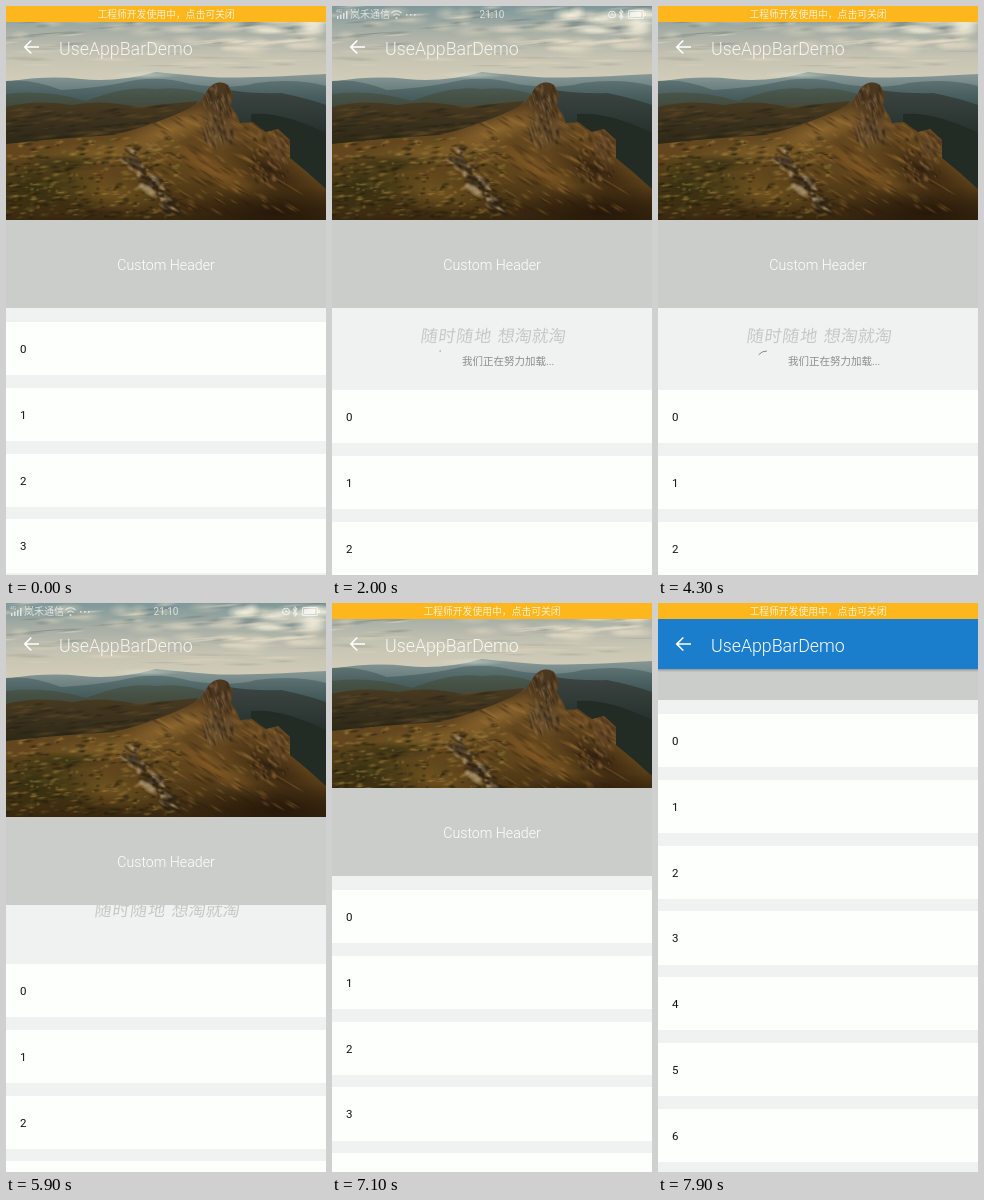
Recreate the animation shown at these times as an HTML page with a canvas. Size 320 by 569 pixels, loop 8 s.

```html
<!DOCTYPE html>
<html lang="zh">
<head>
<meta charset="utf-8">
<title>UseAppBarDemo</title>
<style>
  html, body { margin: 0; width: 100%; height: 100%; overflow: hidden; }
  #stage { position: relative; width: 320px; height: 569px; overflow: hidden; background: #f0f2f1;
    font-family: Roboto, "Noto Sans CJK SC", "Noto Sans CJK", sans-serif; }
  #stage div, #stage svg, canvas { position: absolute; left: 0; }
  .item { width: 320px; height: 53.3px; background: #fdfffd; color: #111; font-size: 11.5px;
    line-height: 54px; text-indent: 14px; }
  #refresh { width: 320px; height: 68px; }
  #refresh svg { top: 0; }
  #header { width: 320px; height: 88px; background: #cbcdcb; color: #fff; font-size: 14.2px;
    font-weight: 300; line-height: 90px; text-align: center; }
  #bar { top: 0; width: 320px; overflow: hidden; }
  #scrim { top: 0; width: 320px; height: 214px; background: #1a7ecd; }
  #shade { width: 320px; height: 3px; background: linear-gradient(#0004, #0000); }
  #chrome { top: 0; }
  #banner { top: 0; width: 320px; height: 16px; background: #fdb61b; color: #fffc; font-size: 9.8px;
    line-height: 17px; text-align: center; white-space: nowrap; }
</style>
</head>
<body>
<div id="stage">
  <div id="list"></div>
  <div id="refresh">
    <svg width="320" height="68" fill="none" stroke-linecap="round">
      <g fill="#c6c8c6" font-size="17" font-weight="300" letter-spacing=".8" font-family="'Noto Sans CJK SC', 'Noto Sans CJK', sans-serif">
        <text transform="translate(88 34) skewX(-8)">随时随地</text>
        <text transform="translate(165 34) skewX(-8)" letter-spacing="0">想淘就淘</text>
      </g>
      <g id="spinner" stroke="#858785" stroke-width="1">
        <path id="arc" pathLength="1" d="M0-10A10 10 0 0 0 0 10A10 10 0 0 0 0-10"/>
        <path id="arrow" d="M0-5V5M-4 1L0 5L4 1"/>
      </g>
      <text id="hint" y="57" fill="#8b8d8b" font-size="10.5"></text>
    </svg>
  </div>
  <div id="header">Custom Header</div>
  <div id="bar">
    <canvas id="photo" width="320" height="214"></canvas>
    <div id="scrim"></div>
  </div>
  <div id="shade"></div>
  <svg id="chrome" width="320" height="66" fill="none" stroke="#fff" stroke-width="1.7">
    <path d="M33 41H19M25.3 34.5L18.8 41L25.3 47.5"/>
    <text id="title" x="53" y="48.5" fill="#fff" stroke="none" font-size="17.8" font-weight="300">UseAppBarDemo</text>
    <g id="status" fill="#fff" stroke="none" font-size="10" opacity=".7">
      <path d="M5 13v-3h1.500v3zM8 13V8.500h1.500V13zM11 13V7h1.500v6zM14 13V5h1.500v8z"/>
      <text x="4" y="7" font-size="5">4G</text>
      <text x="18" y="12">岚禾通信</text>
      <g fill="none" stroke="#fff" stroke-width="1.100">
        <path d="M59.500 7q5-4.500 10 0M61.500 9.500q3-3 6 0"/>
        <circle cx="280" cy="8.500" r="3.300"/>
        <path d="M280 6.500v2h1.500M287 5.500l4 5.500-2 2V4l2 2-4 5.500"/>
        <rect x="296.500" y="4.500" width="15" height="8" rx="1.500"/>
      </g>
      <circle cx="64.500" cy="12" r="1"/>
      <path d="M74 8h1.500v1.500H74zM78 8h1.500v1.500H78zM82 8h1.500v1.500H82zM298 6h11v5h-11zM312.500 7h1.500v3h-1.500z"/>
      <text x="160" y="12" text-anchor="middle">21:10</text>
    </g>
  </svg>
  <div id="banner">工程师开发使用中，点击可关闭</div>
</div>
<script>
const LOOP = 8000, STEP = 100, PITCH = 65.8, HINT_H = 68;
const $ = id => document.getElementById(id);
const clamp = v => Math.max(0, Math.min(1, v));

// [time, pixels]
const PULL = [[400, 0], [500, 8], [800, 45], [1000, 66], [1300, 90], [1600, 96], [1700, 96],
  [1800, 84], [1900, 73], [2000, 68], [5700, 68], [5800, 60], [5900, 45], [6000, 29],
  [6100, 15], [6200, 6], [6300, 2], [6700, 0]];
const SCROLL = [[6900, 0], [7000, 10], [7100, 29], [7300, 82], [7500, 136], [7700, 181], [7900, 205]];

function track(keys, t) {
  const i = keys.findIndex(k => k[0] >= t);
  if (i < 0) return keys[keys.length - 1][1];
  if (!i) return keys[0][1];
  const [t0, v0] = keys[i - 1], [t1, v1] = keys[i];
  return v0 + (v1 - v0) * (t - t0) / (t1 - t0);
}

function paintPhoto() {
  const c = $('photo').getContext('2d');
  let seed = 7;
  const rnd = () => (seed = seed * 16807 % 2147483647) / 2147483647;
  const fade = (y0, y1, ...cols) => {
    const g = c.createLinearGradient(0, y0, 0, y1);
    cols.forEach((col, i) => g.addColorStop(i / (cols.length - 1), col));
    return g;
  };
  const shape = (d, fill) => { c.fillStyle = fill; c.fill(new Path2D(d)); };
  const blob = (x, y, rx, ry, rgb, a, turn = 0) => {
    c.save();
    c.translate(x, y);
    c.rotate(turn);
    c.scale(rx, ry);
    const g = c.createRadialGradient(0, 0, 0, 0, 0, 1);
    g.addColorStop(0, `rgba(${rgb},${a})`);
    g.addColorStop(1, `rgba(${rgb},0)`);
    c.fillStyle = g;
    c.fillRect(-1, -1, 2, 2);
    c.restore();
  };
  // Short soft strokes scattered over a box, all leaning the same way
  const scatter = (n, x, y, w, h, len, turn, rgbs, a) => {
    for (let i = 0; i < n; i++) {
      blob(x + rnd() * w, y + rnd() * h, len * (.4 + rnd()), 1 + rnd() * 1.6, rgbs[i % rgbs.length], a, turn);
    }
  };

  // Sky
  c.fillStyle = fade(0, 75, '#7f9899', '#a7aea5', '#c5c3b2', '#d2cdb9');
  c.fillRect(0, 0, 320, 80);
  scatter(60, 0, 0, 320, 40, 24, -.08, ['236,226,204', '104,116,116'], .5);
  for (let i = 0; i < 45; i++) blob(rnd() * 320, 4 + rnd() * 42, 8 + rnd() * 15, 3 + rnd() * 5, '238,227,202', .4);
  for (let i = 0; i < 14; i++) blob(235 + rnd() * 85, 5 + rnd() * 22, 9 + rnd() * 12, 4 + rnd() * 4, '255,247,226', .6);
  scatter(30, 0, 38, 320, 25, 26, 0, ['224,214,190', '160,160,148'], .45);

  // Receding hills
  shape('M0 76Q40 69 75 73T150 66Q180 69 205 71T320 68V130H0Z', fade(66, 100, '#8a9b98', '#50666a'));
  shape('M0 75Q25 72 55 84Q90 82 115 77Q150 68 185 78Q225 84 250 77Q290 72 320 80V140H0Z', fade(72, 108, '#607675', '#34494b'));
  blob(140, 69, 35, 4, '222,226,214', .5);
  shape('M0 88Q40 83 80 95Q120 79 150 83Q180 80 205 90V140H0Z', fade(80, 120, '#4c5b51', '#37392a'));
  shape('M222 84Q250 88 275 87Q300 92 320 99V214H222Z', fade(82, 140, '#3c4541', '#202c28'));
  shape('M245 108Q275 105 320 127V195H245Z', '#222b24');
  shape('M0 101Q30 93 66 99Q96 93 130 101L192 95L160 140H0Z', fade(94, 140, '#493b22', '#2c2716'));
  scatter(70, 0, 100, 165, 32, 12, -.12, ['108,81,40', '30,27,16'], .45);

  // Near slope
  c.save();
  c.clip(new Path2D('M0 138Q55 132 108 129Q148 119 180 104L194 96L203 82Q212 73 222 79L227 89L225 100L231 109L234 117L246 116L260 126L272 123L284 134L284 152L301 166L320 183V214H0Z'));
  c.fillStyle = fade(75, 214, '#50391f', '#664820', '#60441b', '#38270f');
  c.fillRect(0, 70, 320, 144);
  blob(165, 124, 70, 15, '151,111,50', .75, -.35);
  blob(205, 163, 60, 12, '145,98,39', .7, .55);
  blob(100, 146, 75, 13, '140,106,43', .6, -.08);
  blob(98, 185, 70, 20, '133,99,37', .65, .2);
  blob(30, 180, 70, 32, '45,44,15', .8);
  blob(62, 157, 45, 9, '48,46,17', .75);
  blob(265, 165, 55, 22, '44,28,13', .75, .5);
  blob(270, 207, 100, 28, '36,22,8', .9);
  scatter(500, 0, 132, 175, 80, 5, -.12, ['157,126,58', '29,26,9', '87,78,31'], .55);
  scatter(190, 145, 112, 145, 95, 11, .55, ['164,119,55', '40,26,11'], .38);
  // Crags
  blob(212, 96, 19, 31, '67,51,32', .9);
  blob(214, 126, 22, 19, '107,83,53', .75);
  scatter(75, 198, 79, 30, 62, 6, 1.25, ['142,111,70', '38,28,18'], .5);
  blob(272, 140, 14, 23, '99,70,40', .8);
  scatter(65, 247, 127, 38, 50, 5, 1, ['142,104,61', '39,27,16'], .5);
  for (let i = 0; i < 75; i++) {
    const k = rnd();
    const x = 120 + k * 45 + rnd() * 14 - 7, y = 146 + k * 55 + rnd() * 16 - 8;
    blob(x, y, 3 + rnd() * 6, 2 + rnd() * 3, i % 3 ? '39,28,17' : '187,163,122', .75, .5);
  }
  c.restore();
}

const items = Array.from({ length: 10 }, (_, i) => {
  const el = document.createElement('div');
  el.className = 'item';
  el.textContent = i;
  $('list').append(el);
  return el;
});

function draw(time) {
  const t = Math.floor(time % LOOP / STEP) * STEP;
  const pull = track(PULL, t), scroll = track(SCROLL, t);
  const edge = 302 - scroll, barH = Math.max(66, 214 - scroll);

  items.forEach((el, i) => el.style.top = edge + pull + 14 + i * PITCH + 'px');
  $('header').style.top = edge - 88 + 'px';
  $('bar').style.height = barH + 'px';
  $('photo').style.top = -.35 * (214 - barH) + 'px';
  $('scrim').style.opacity = clamp((scroll - 95) / 52);
  $('title').setAttribute('opacity', .85 + .15 * clamp(scroll / 147));
  $('shade').style.top = barH + 'px';
  $('shade').style.opacity = clamp((scroll - 130) / 17);

  const loading = t >= 1900 && t < 5800, pulling = t < 1900;
  $('refresh').style.top = edge + pull - HINT_H + 'px';
  $('refresh').style.visibility = pull > 0 ? 'visible' : 'hidden';
  $('hint').textContent = loading ? '我们正在努力加载...' : !pulling ? '' : pull > HINT_H ? '松开刷新' : '下拉刷新';
  $('hint').setAttribute('x', loading ? 130 : 155);
  $('spinner').setAttribute('transform', `translate(${loading ? 108.5 : 132} 53)`);
  $('spinner').style.display = loading || pulling ? '' : 'none';
  $('arrow').style.display = loading ? 'none' : '';
  const turn = loading ? (t - 1990 + 1082) / 1082 % 1 : clamp(pull / HINT_H);
  $('arc').setAttribute('stroke-dasharray', `${turn} 2`);

  const clear = (t >= 1300 && t < 3100) || (t >= 4900 && t < 6600);
  $('banner').style.display = clear ? 'none' : '';
  $('status').style.display = clear ? '' : 'none';
}

paintPhoto();
const start = performance.now();
function tick() {
  draw(performance.now() - start);
  requestAnimationFrame(tick);
}
tick();
</script>
</body>
</html>
```
